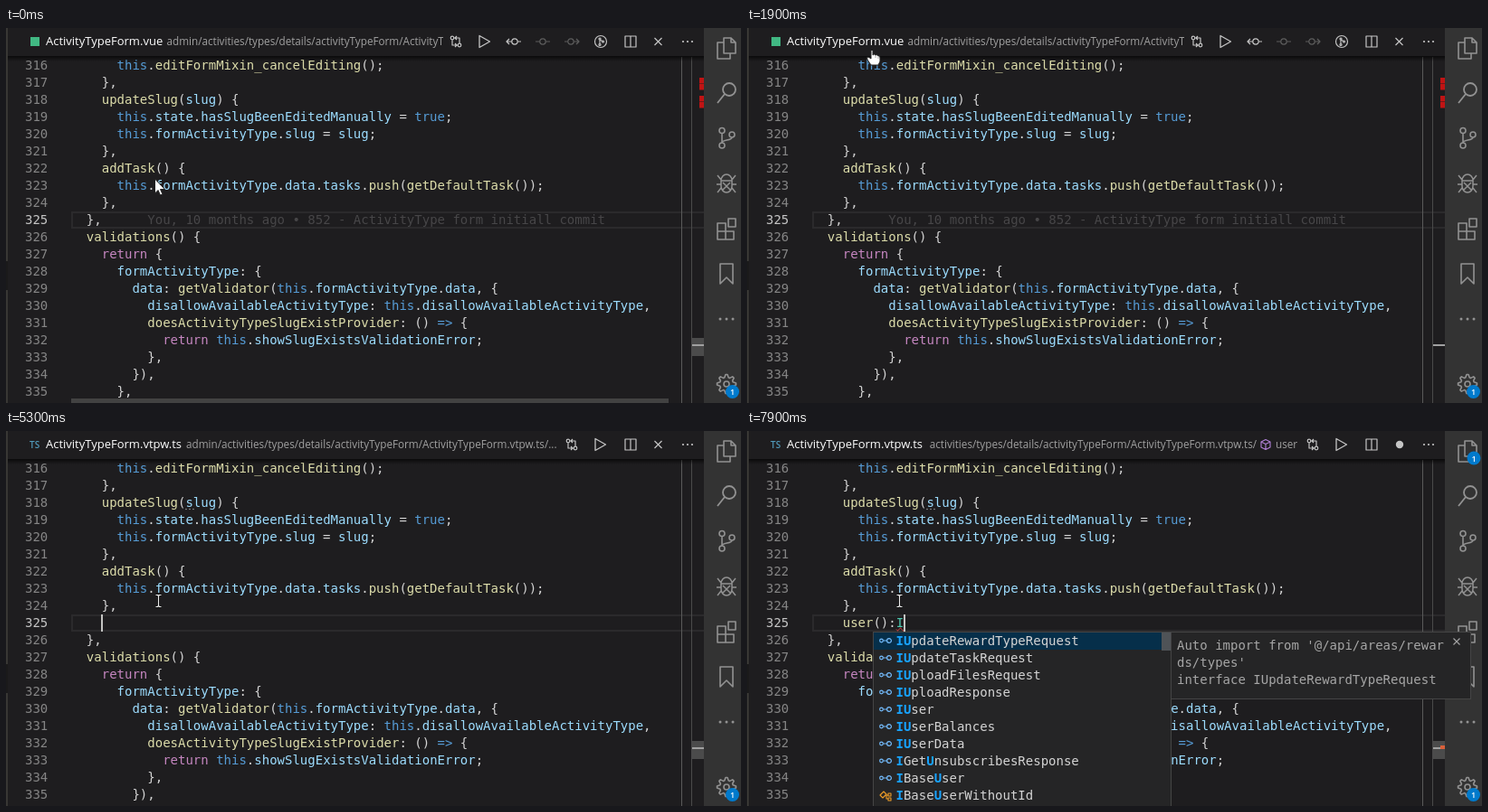
Animation of 812x415 px, one loop 8000 ms. Source, as an HTML page with a canvas:

```html
<!DOCTYPE html>
<html lang="en">
<head>
<meta charset="utf-8">
<title>Code editor</title>
<style>
html, body { margin: 0; width: 812px; height: 415px; overflow: hidden; background: #1e1d1f; }
canvas { display: block; }
</style>
</head>
<body>
<canvas id="stage" width="812" height="415"></canvas>
<script>
const ctx = document.getElementById('stage').getContext('2d');
const LOOP = 8000, LEFT = 72, TOP = 32, ROW = 19, CW = 8.428;
const BG = '#1e1d1f', BAR = '#333333', ICON = '#c5c5c5', DIM = '#5c5c5c', SIDE = '#929292';
const MONO = '14px "DejaVu Sans Mono", monospace';
const UI = '"Open Sans", "Noto Sans", sans-serif';

const CODE = `      this.editFormMixin_cancelEditing();
    },
    updateSlug(slug) {
      this.state.hasSlugBeenEditedManually = true;
      this.formActivityType.slug = slug;
    },
    addTask() {
      this.formActivityType.data.tasks.push(getDefaultTask());
    },
  },
  validations() {
    return {
      formActivityType: {
        data: getValidator(this.formActivityType.data, {
          disallowAvailableActivityType: this.disallowAvailableActivityType,
          doesActivityTypeSlugExistProvider: () => {
            return this.showSlugExistsValidationError;
          },
        }),
      },`.split('\n');

const BLAME = 'You, 10 months ago • 852 - ActivityType form initiall commit';
const DIR = 'activities/types/details/activityTypeForm/ActivityTypeForm.';
const HINTS = ['IUpdateRewardTypeRequest', 'IUpdateTaskRequest', 'IUploadFilesRequest', 'IUploadResponse',
  'IUser', 'IUserBalances', 'IUserData', 'IGetUnsubscribesResponse', 'IBaseUser', 'IBaseUserWithoutId'];
const INFO = ["Auto import from '@/api/areas/rewar", "ds/types'", 'interface IUpdateRewardTypeRequest'];

// [time, typed text, caret column]
const TYPED = [[5300, '', 4], [5700, 'u', 5], [5800, 'us', 6], [5900, 'use', 7], [6000, 'user', 8],
  [6400, 'user()', 9], [6500, 'user()', 10], [6800, 'user():', 11], [7600, 'user():I', 12]];
const CARET_FLIPS = [400, 900, 1400, 1900, 2400, 3300, 3800, 4200, 4700, 7300, 7600];
// [time, x, y]
const PATH = [[0, 164, 167], [100, 176, 248], [300, 176, 248], [600, 172, 245], [800, 170, 180], [900, 170, 116],
  [1300, 166, 100], [1700, 143, 17], [1900, 140, 33], [2100, 140, 17], [2600, 140, 17], [2800, 200, 70],
  [3100, 200, 70], [3500, 231, 54], [3700, 218, 45], [3900, 202, 35], [4200, 200, 33], [4300, 200, 33],
  [4500, 180, 120], [4700, 168, 188], [8000, 168, 188]];

function rect(x, y, w, h, color) {
  ctx.fillStyle = color;
  ctx.fillRect(x, y, w, h);
}

function text(s, x, y, color, font) {
  if (font) ctx.font = font;
  ctx.fillStyle = color;
  ctx.fillText(s, x, y);
}

function disc(x, y, r, color) {
  ctx.fillStyle = color;
  ctx.beginPath();
  ctx.arc(x, y, r, 0, 7);
  ctx.fill();
}

function icon(x, y, d, color, width = 1.2, fill) {
  ctx.save();
  ctx.translate(x, y);
  const p = new Path2D(d);
  if (fill) { ctx.fillStyle = fill; ctx.fill(p); }
  ctx.strokeStyle = color;
  ctx.lineWidth = width;
  ctx.lineJoin = 'round';
  ctx.stroke(p);
  ctx.restore();
}

const ring = (x, y, r) => `M${x + r} ${y}A${r} ${r} 0 1 1 ${x - r} ${y}A${r} ${r} 0 1 1 ${x + r} ${y}`;

function dots(x, y, gap, r, color) {
  for (const i of [-1, 0, 1]) disc(x + i * gap, y, r, color);
}

function badge(x, y) {
  disc(x, y, 7.5, '#007acc');
  ctx.textAlign = 'center';
  text('1', x, y + 3.5, '#fff', '600 9px ' + UI);
  ctx.textAlign = 'left';
}

function wave(x, end, y, color) {
  ctx.strokeStyle = color;
  ctx.lineWidth = 1;
  ctx.beginPath();
  for (let i = x; i <= end; i += 0.5) ctx.lineTo(i, y + 1.4 * Math.sin((i - x) * Math.PI / 3));
  ctx.stroke();
}

function colorOf(word, rest, before) {
  if (/^(this|true|=>)$/.test(word)) return '#569cd6';
  if (word === 'return') return '#c586c0';
  if (!/^\w/.test(word)) return '#d4d4d4';
  if (before.endsWith('():')) return '#4ec9b0';
  return /^(: )?\(/.test(rest) ? '#dcdcaa' : '#9cdcfe';
}

function codeLine(line, y) {
  ctx.font = MONO;
  for (const m of line.matchAll(/=>|\w+|[^\w\s]/g)) {
    const end = m.index + m[0].length;
    text(m[0], LEFT + m.index * CW, y, colorOf(m[0], line.slice(end), line.slice(0, m.index)));
  }
}

function titleBar(t, ts) {
  rect(0, 0, 771, 32, BG);
  const shade = ctx.createLinearGradient(0, 31, 0, 37);
  shade.addColorStop(0, 'rgba(0,0,0,.65)');
  shade.addColorStop(1, 'rgba(0,0,0,0)');
  rect(2, 31, 769, 6, shade);

  if (ts) text('TS', 26, 19, '#519aba', '600 10px ' + UI);
  else rect(27, 10, 10, 10, '#41b883');
  text('ActivityTypeForm.' + (ts ? 'vtpw.ts' : 'vue'), 44, 19, '#ffffff', '13px ' + UI);

  const x = ts ? 199 : 177.5;
  ctx.save();
  ctx.beginPath();
  ctx.rect(x, 0, (ts ? 609 : 483) - x, 31);
  ctx.clip();
  ctx.font = '11.7px ' + UI;
  const grey = '#a0a0a0';
  if (t >= 7100) {
    ctx.textAlign = 'right';
    text(DIR + 'vtpw.ts/', 563, 19, grey);
    ctx.textAlign = 'left';
    text('user', 584, 19, grey);
    icon(573, 15, 'M0-5.5L5-3V3L0 5.5L-5 3V-3ZM-5-3L0-.5L5-3M0-.5V5.5', '#b180d7', 1.1);
  } else {
    text('admin/' + DIR + (ts ? 'vtpw.ts/...' : 'vue/...'), x, 19, grey);
  }
  ctx.restore();

  icon(ts ? 625 : 497, 15,
    ring(-4, -4, 1.8) + ring(4, 4, 1.8) + 'M-4-2V4H1M-1 2L1 4L-1 6M4 2V-4H-1M1-6L-1-4L1-2', ICON);
  icon(ts ? 656 : 528, 15, 'M-5-6.5L6.5 0L-5 6.5Z', ICON, 1.3);
  if (!ts) {
    icon(561, 15, ring(1, 0, 3.2) + 'M-8 0H-2.2M4.2 0H8M-5-3L-8 0L-5 3', ICON);
    icon(593, 15, ring(0, 0, 3.2) + 'M-8 0H-3.2M3.2 0H8', DIM);
    icon(625, 15, ring(-1, 0, 3.2) + 'M8 0H2.2M-4.2 0H-8M5-3L8 0L5 3', DIM);
    icon(657, 15, ring(0, 0, 6.5) + ring(-1, -3, 1) + ring(-1, 3.5, 1) + ring(2.5, 0, 1) + 'M-1-2V2.5M-1-2L2-.5', ICON);
  }
  icon(690, 15, 'M-6-6H6V6H-6ZM0-6V6', ICON);
  if (t >= 5400) disc(721, 15, 4.2, ICON);
  else icon(720.5, 15, 'M-4-4L4 4M4-4L-4 4', ICON);
  dots(753, 15, 5, 1.1, ICON);
}

function gear(x, y) {
  let d = '';
  for (let i = 0; i < 32; i++) {
    const r = i % 4 < 2 ? 10.5 : 7.5, a = (i - 0.5) * Math.PI / 16;
    d += (i ? 'L' : 'M') + (r * Math.cos(a)).toFixed(2) + ' ' + (r * Math.sin(a)).toFixed(2);
  }
  icon(x, y, d + 'Z' + ring(0, 0, 3), SIDE, 1.6);
}

function sideBar(t) {
  rect(771, 0, 41, 415, BAR);
  icon(796, 22, 'M-3-11H5L10-6V6H-3ZM5-11V-6H10M-3-6H-10V12H4V6', SIDE, 1.6);
  icon(796, 72, ring(3, -4, 7) + 'M-2 1L-10 11', SIDE, 1.8);
  icon(796, 121, ring(-5, -7.5, 3) + ring(-5, 9, 3) + ring(6, -3, 3) + 'M-5-4.5V6M6 0C6 4-5 2-5 6', SIDE, 1.6);
  icon(796, 172, 'M-6-3A6 7 0 0 1 6-3V3A6 7 0 0 1-6 3ZM-6-3H6M-6-4L-10-9M6-4L10-9M-6 1H-11M6 1H11M-6 5L-10 10M6 5L10 10M-4-1L4 7M4-1L-4 7', SIDE, 1.5);
  icon(796, 222, 'M-10-6H-1V12H-10ZM-10 3H8V12H-1M2-11H10V-2H2Z', SIDE, 1.6);
  icon(796, 272, 'M-7-11H7V11L0 4L-7 11Z', SIDE, 1.6);
  dots(796, 322, 7, 1.5, SIDE);
  gear(796, 394);
  badge(802.5, 402.5);
  if (t >= 5400) badge(803, 30);
}

function ruler(t, ts) {
  rect(746, 32, 1, 383, '#5a5a5a');
  rect(757, 32, 1, 383, '#4a4a4a');
  if (t < 1600 || ts) rect(757, 343, 14, 20, '#4b4b4b');
  if (t < 1600) rect(72, 410, 660, 5, '#424242');
  rect(758, 350, 13, 2, '#a0a0a0');
  if (!ts) for (const y of [55, 62, 75, 82]) rect(766, y, 5, 6.5, '#c01414');
  if (t >= 6000) rect(766, 348, 5, 4, t < 7400 ? '#c9a227' : '#d9603a');
}

function hintIcon(x, y, isClass) {
  if (isClass) icon(x, y, 'M-6 0L-2-4L1-1L-3 3ZM-1 0H3M1 0V4H3M3-2H6V1H3ZM3 3H6V6H3Z', '#ee9d28', 1.1);
  else icon(x, y, ring(-4.5, 0, 1.8) + ring(4, 0, 2.4) + 'M-2.7 0H1.6', '#75beff', 1.2);
}

function popup(t) {
  rect(139, 222, 330, 193, '#454545');
  rect(140, 223, 328, 192, '#252526');
  rect(140, 223, 328, ROW, '#062f4a');
  rect(458, 223, 10, 20, '#4f5357');
  HINTS.forEach((s, i) => {
    const y = 237 + i * ROW;
    hintIcon(153, y - 5, i === 9);
    const u = s.indexOf('U');
    [...s].forEach((c, k) => {
      const hit = k === 0 || k === u;
      text(c, 164.5 + k * CW, y, hit ? '#18a3ff' : '#d4d4d4', (hit ? 'bold ' : '') + MONO);
    });
  });
  if (t < 7900) return;
  rect(468, 222, 332, 75, '#454545');
  rect(469, 223, 330, 73, '#252526');
  INFO.forEach((s, i) => text(s, 475, 241.5 + i * ROW, '#a6a6a6', MONO));
  icon(784, 233, 'M-3.5-3.5L3.5 3.5M3.5-3.5L-3.5 3.5', '#a6a6a6', 1.1);
}

function pointer(t) {
  if (t >= 1000 && t < 1300) return;
  const i = PATH.findIndex(p => p[0] > t);
  const [t0, x0, y0] = PATH[i - 1], [t1, x1, y1] = PATH[i];
  const k = (t - t0) / (t1 - t0);
  const x = Math.round(x0 + (x1 - x0) * k), y = Math.round(y0 + (y1 - y0) * k);
  if (t < 100) {
    icon(x, y, 'M.5 0V16L4 12.5L6.5 18L9 17L6.5 11.5H11.5Z', '#222', 1, '#fff');
  } else if (y < 46) {
    icon(x, y, 'M-3-8Q-2-10-1-8V-3Q1-5 2-3Q4-4 5-2Q7-3 7 0V4L5 8H-3L-7 2Q-8-1-6-1L-3 1Z', '#222', 1, '#fff');
    icon(x, y, 'M2-3V0M5-2V1', '#999', 0.8);
  } else {
    icon(x + 0.5, y, 'M-3-6.5H-1L0-5.5L1-6.5H3M0-5.5V5.5M-3 6.5H-1L0 5.5L1 6.5H3', '#111', 2.6);
    icon(x + 0.5, y, 'M-3-6.5H-1L0-5.5L1-6.5H3M0-5.5V5.5M-3 6.5H-1L0 5.5L1 6.5H3', '#eee', 1.1);
  }
}

function draw(t) {
  const ts = t >= 2700;
  const step = TYPED.filter(s => s[0] <= t).pop();
  const active = t >= 4700 && t < 5300 ? 8 : 9;
  const lines = CODE.slice();
  if (step) lines.splice(9, 0, '    ' + step[1]);

  rect(0, 0, 812, 415, BG);
  const y = TOP + active * ROW;
  rect(LEFT, y, 699, ROW, '#2b2a2c');
  rect(LEFT + 2, y + 2, 697, ROW - 4, BG);

  for (let i = 0; i < 20; i++) {
    const base = TOP + i * ROW + 14;
    text(316 + i, 21, base, i === active ? '#c6c6c6' : '#858585', MONO);
    codeLine(lines[i], base);
  }
  if (!ts) text(BLAME, LEFT + 10 * CW, y + 14, '#474648', MONO);
  else dots(203, 86.5, 4, 0.8, '#9a9a9a');
  if (t >= 5900 && t < 6600) wave(72, 106, 219.5, '#cca700');
  if (t >= 7600) wave(165, 173, 219.5, '#f14c4c');

  const flips = CARET_FLIPS.filter(f => f <= t).length;
  const on = t >= 2700 && t < 3300 || t >= 4700 && t < 7300 || flips % 2;
  if (on) {
    const col = step ? step[2] : active === 8 ? 6 : 4;
    rect(Math.floor(LEFT + col * CW), y, 2, ROW, '#c4c4c2');
  }

  ruler(t, ts);
  titleBar(t, ts);
  rect(0, 0, 2, 415, '#383734');
  rect(0, 258, 2, 32, '#1a1a1a');
  sideBar(t);
  if (t >= 7700) popup(t);
  pointer(t);
}

const start = performance.now();
function tick(now) {
  const t = Math.max(0, now - start) % LOOP;
  draw(Math.floor(t / 100) * 100);
  requestAnimationFrame(tick);
}
draw(0);
requestAnimationFrame(tick);
</script>
</body>
</html>
```
